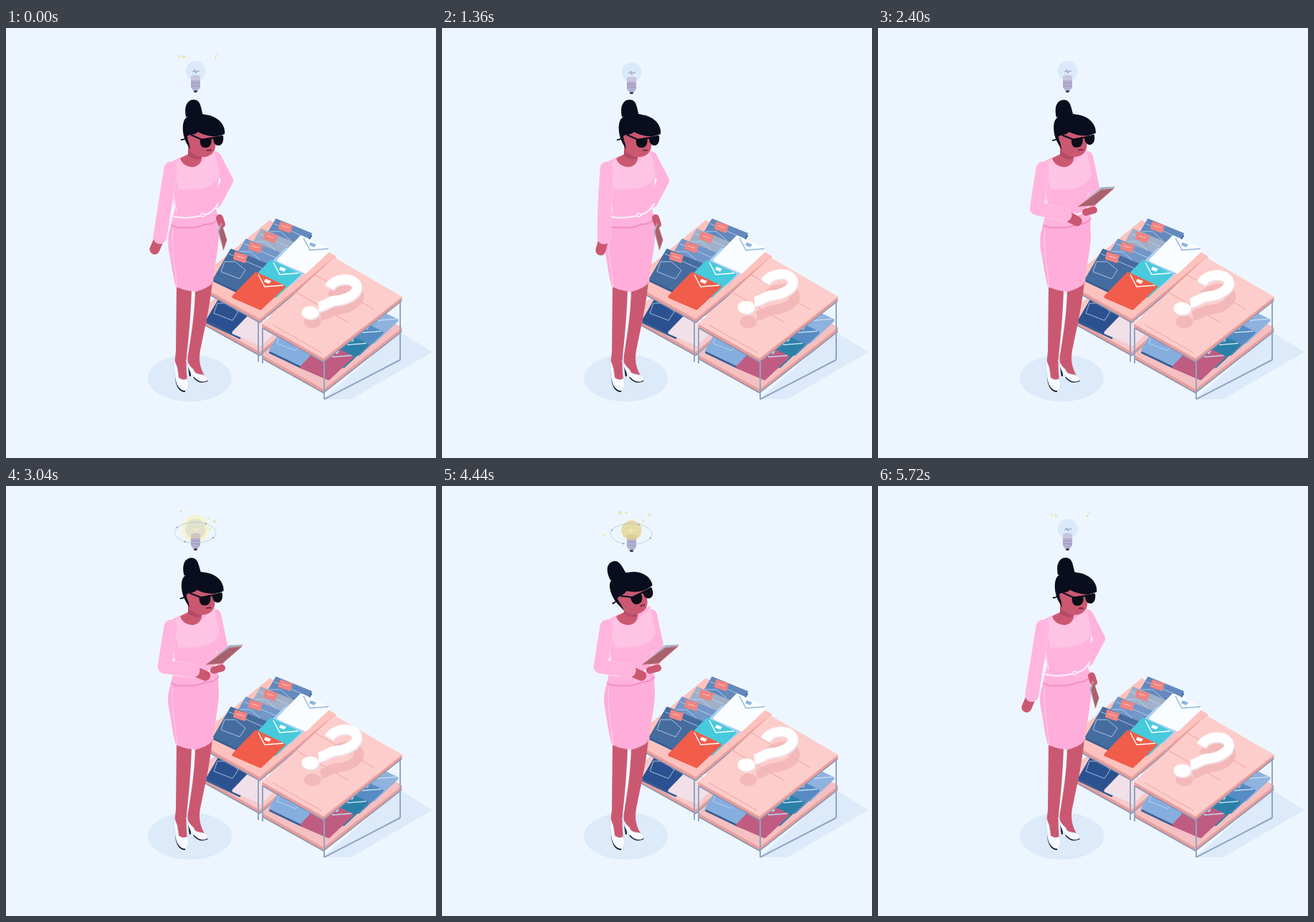
An HTML page for the animation above (5760 ms loop, 600 by 600 pixels).

```html
<!DOCTYPE html>
<html lang="en">
<head>
<meta charset="utf-8">
<style>
html, body { margin: 0; width: 100%; height: 100%; overflow: hidden; background: #edf6fe; }
svg { display: block; width: 100vw; height: 100vh; }
.limb { fill: none; stroke-linecap: round; stroke-linejoin: round; }
.skin { fill: #cb5871; }
.flesh { stroke: #cb5871; }
.hair { fill: #090d1d; }
.shoe { fill: #f7f9ff; stroke: #c9d4ea; stroke-width: .6; }
</style>
</head>
<body>
<svg viewBox="0 0 600 600">
  <path fill="#dceafa" d="M443 518H482L595 452 549 424Z"/>
  <ellipse cx="256.500" cy="488.500" rx="58.500" ry="33" fill="#dceafa"/>
  <g id="shop"></g>

  <g id="markShadow" transform="translate(3 23)" color="#f1b5b6" opacity=".8"></g>
  <g id="mark"><g transform="translate(1 2)" color="#f1dfe7"></g><g color="#fff"></g></g>

  <!-- legs and shoes -->
  <path class="skin" d="M264 360L288 354C284 392 277 420 272 445 268 462 270 474 279 488H266C257 478 252 470 254 456 259 425 264 395 264 360Z"/>
  <path class="skin" d="M238 358L259 364C258 400 255 430 252 458 251 472 252 482 253 492H238C234 480 235 468 237 452Z"/>
  <path d="M255 471L257 486M237 488Q239 507 250 507M262 487Q270 497 281 492" fill="none" stroke="#111629" stroke-width="2.200"/>
  <path class="shoe" d="M251 463Q257 473 262 477C264 486 275 481 281 487 284 494 273 495 267 491 259 485 255 477 251 463Z"/>
  <path class="shoe" d="M234 461L239 474 241 488Q248 493 253 489 258 502 250 506 240 505 237 492 234 476 234 461Z"/>

  <!-- skirt and top -->
  <path fill="#ffaddb" d="M233 270C225 285 225 302 228 314 231 332 233 347 237 361Q250 367 264 368 280 364 287 357C291 335 296 310 297 292L296 264Z"/>
  <path fill="none" stroke="#ffc7e6" stroke-width="1.500" d="M233 281C230 302 236 335 239 362"/>
  <path fill="#ffb3dc" d="M246 179C234 186 226 187 222 193L236 250 230 275Q240 280 250 278 264 280 278 274 290 274 297 266L290 243C295 228 298 212 298 195L290 167 272 178Z"/>
  <path fill="none" stroke="#f48fc6" stroke-width="2" d="M230 275Q240 280 250 278 264 280 278 274 290 274 297 266"/>
  <path id="rightSleeve" class="limb" stroke="#ffb3dc" stroke-width="16"/>
  <path fill="#ffc3e4" d="M238 185L246 180Q258 199 274 186L291 170 298 205Q292 219 280 222 262 227 240 225 236 202 238 185Z"/>
  <path fill="none" stroke="#fff1fa" stroke-width="2.200" d="M234 263Q250 267 272 262 289 259 296 245"/>
  <circle cx="274.500" cy="261" r="2.500" fill="#ffb3dc" stroke="#fff1fa" stroke-width="1.300"/>
  <path fill="none" stroke="#ffe0f2" stroke-width="1.300" d="M232 222L238 257"/>
  <path class="skin" d="M243 182L254 176V164H273V179Q274 191 262 194 247 194 243 182Z"/>
  <path fill="#a9445d" opacity=".65" d="M254 170Q265 180 273 179V182Q263 185 254 178Z"/>

  <g id="head">
    <path class="skin" d="M250 139L253 162C257 174 265 181 276 180 286 179 291 173 292 166L294 146 288 136Z"/>
    <path class="hair" d="M251 124C248 109 253 100 262 100 272 100 272 112 275 122Z"/>
    <path class="hair" d="M254 164C246 152 245 136 249 128 255 119 268 118 279 121 296 123 307 136 305 148 294 153 281 152 268 145 263 150 258 147 254 152L257 170Z"/>
    <path d="M256 149Q251 156 244 156" fill="none" stroke="#090d1d" stroke-width="1.800"/>
    <path class="skin" d="M253 151Q259 146 261 155L259 163Q254 162 253 151Z"/>
    <path d="M258 149L274 156 302 151" fill="none" stroke="#111629" stroke-width="2.300"/>
    <path fill="#0b0e19" d="M271 155L286 153C288 160 285 167 279 167 272 168 270 161 271 155ZM289 153L303 150C304 158 302 163 297 164 291 164 289 159 289 153Z"/>
    <path d="M280 171Q284 170 287 171" fill="none" stroke="#702638" stroke-width="1.800"/>
  </g>

  <!-- arms and notebook -->
  <path id="leftHand" class="limb flesh" stroke-width="14"/>
  <path id="sleeveEdge" class="limb" stroke="#ffc9e7" stroke-width="19.500"/>
  <path id="leftSleeve" class="limb" stroke="#ffb5dd" stroke-width="18"/>
  <path id="rightHand" class="limb flesh" stroke-width="10"/>
  <g id="notebook">
    <path fill="#9db3c6" d="M-26 -3L13 -8 30 2 -6 8Z"/>
    <path fill="#a8616d" stroke="#d97f80" stroke-width=".7" d="M-29 -3L11 -5 27 3 -9 8Z"/>
  </g>

  <!-- bulb -->
  <g id="bulb">
    <circle id="halo" cx="264.500" cy="60" r="19" fill="#f8f2c9"/>
    <circle cx="264.500" cy="60" r="14" fill="#dbeafb"/>
    <path fill="#c8c6de" d="M258 67Q264.500 64 271 67V74H258Z"/>
    <circle id="glow" cx="264.500" cy="60" r="14" fill="#edcd58"/>
    <path fill="#b3afd0" d="M258 73H271V83L267 88H262L258 83Z"/>
    <path d="M258 76L271 77M258 80L271 81" stroke="#9794bd" stroke-width=".8"/>
    <ellipse cx="264.500" cy="88.500" rx="2.600" ry="1.500" fill="#343650"/>
    <path id="filament" fill="none" stroke-width=".9" d="M260 61H262L263.500 58 265 63 266.500 60H270"/>
    <g id="orbit"><ellipse cx="264" cy="65" rx="29" ry="14.500" fill="none" stroke="#a9c0da" stroke-width=".8"/><g id="moons" fill="#7e9fc4"></g></g>
  </g>
  <g id="sparks" fill="none" stroke="#ecd067"></g>
</svg>
<script>
const $ = id => document.getElementById(id);
const LOOP = 5760, BOB = LOOP / 3;
const at = (x, y, content) => `<g transform="translate(${x} ${y})">${content}</g>`;
const shape = (d, fill, join = 0) =>
  `<path d="M${d}Z" fill="${fill}" stroke="${fill}" stroke-width="${join}" stroke-linejoin="round"/>`;
const line = (d, color, width = 1) =>
  `<path d="${d}" fill="none" stroke="${color}" stroke-width="${width}"/>`;

// ----- shop display -----
const rear = '368 268L460 318 354 406 262 355';
const near = '458 320L553 375 443 461 357 413';
const plank = (top, y, fill) =>
  at(0, y + 6, shape(top, '#8e94b0')) +
  [4, 3, 2, 1].map(d => at(0, y + d, shape(top, '#e99e9c'))).join('') +
  at(0, y, shape(top, fill));

const jeans = (x, y, color) => at(x, y,
  at(0, 3, shape('290 350L314 309 363 329 336 372', '#365d92', 2)) +
  shape('290 350L314 309 363 329 336 372', color, 2) +
  line('M311 315L359 336M300 340L305 326 320 326 334 338 326 350Z', '#c6d9f0', .8) +
  shape('320 313L336 318 333 327 318 322', '#f08482', 2) +
  line('M322 318L332 321', '#ffc3bd'));

const shirt = (x, y, color, trim = '#fff') => at(x, y,
  shape('318 375L349 343 387 361 355 391', color, 5) +
  line('M352 344L361 361 387 359', trim, 1.400) +
  shape('362 350L370 353 367 357 360 354', trim));

// Rows of folded clothes, drawn from the back to the front.
const row = (item, x, y, rise, colors, trim) =>
  colors.map((c, i) => item(x + 21 * i, y - rise * i, c, trim)).reverse().join('');
const pole = d => line(d, '#8fa5c3', 2);

$('shop').innerHTML =
  plank(rear, 46, '#f7c9ca') +
  jeans(-10, 58, '#2b5190') + shirt(0, 50, '#f1e0e8') +
  plank(rear, 0, '#fdc2be') +
  row(jeans, 0, 0, 14, ['#456c9f', '#7297c9', '#9fb0c8', '#6389bd']) +
  row(shirt, 0, 0, 17, ['#f15d4a', '#47cadb', '#a9cff5']) +
  shirt(63, -51, '#fafdff', '#8fb4de') +
  pole('M352 410V466M444 518L550 463') +
  plank(near, 43, '#f4c0c1') +
  jeans(78, 100, '#85aedf') +
  row(shirt, 95, 98, 17, ['#c05c82', '#2c80a7', '#568bc3', '#8fb2df'], '#bfdcf0') +
  plank(near, 0, '#fdcdcb') +
  line('M431 344L514 393M402 367L478 411M372 414L440 453', '#f1aaa8', 1.100) +
  pole('M358 418V468M444 466V518M550 380V463');

const question = `<ellipse cx="424.500" cy="387" rx="12" ry="9" fill="currentColor"/>
  <path d="M451 352C458 339 482 336 489 348 494 360 474 369 461 370 451 370 446 378 436 379"
    fill="none" stroke="currentColor" stroke-width="13.500"/>`;
for (const g of [$('markShadow'), ...$('mark').children]) g.innerHTML = question;

// ----- motion -----
const ease = (t, from, to) => {
  const k = Math.min(1, Math.max(0, (t - from) / (to - from)));
  return k * k * (3 - 2 * k);
};
// Rises from a to b, holds, then falls from c to d.
const pulse = (t, a, b, c, d) => ease(t, a, b) - ease(t, c, d);
const random = seed => {
  const v = Math.sin(seed * 127.1) * 43758.5453;
  return v - Math.floor(v);
};
const polar = ([x, y], r, degrees) => {
  const a = degrees * Math.PI / 180;
  return [x + r * Math.cos(a), y + r * Math.sin(a)];
};
const setPath = (id, ...points) => $(id).setAttribute('d', 'M' + points.join('L'));
const fade = (id, value) => $(id).setAttribute('opacity', value);
const place = (id, value) => $(id).setAttribute('transform', value);

function drawArms(t) {
  const hang = pulse(t, 0, 760, 5150, 5660);
  const turn = pulse(t, 1450, 2380, 5150, 5660);
  const fold = pulse(t, 1850, 2500, 5150, 5660);

  const shoulder = [230, 196];
  const elbow = [222 + 5 * hang - 6 * fold, 246 + 6 * fold];
  const angle = 99 - 8 * hang - 83 * fold;
  const wrist = polar(elbow, 46 - 6 * fold, angle);
  setPath('leftSleeve', shoulder, elbow, wrist);
  setPath('sleeveEdge', shoulder, elbow, wrist);
  setPath('leftHand', wrist, polar(wrist, 19, angle + 14));

  setPath('rightSleeve', [292, 180], [309 - 6 * turn, 213 + 19 * turn], [293, 243 + 9 * turn]);
  setPath('rightHand', [298 - 8 * turn, 265 - 8 * turn], [301, 274 - 20 * turn]);
  place('notebook', `translate(${302 + 3 * turn} ${291 - 55 * turn})
    rotate(${-100 + 67 * turn}) scale(${.66 + .34 * turn})`);
}

function drawBulb(t) {
  const drop = 8 * pulse(t, 0, 700, 700, 1700) + 6 * pulse(t, 4250, 4750, 4750, 5500);
  const lit = pulse(t, 2800, 3500, 4200, 4700);
  place('bulb', `translate(0 ${drop})`);
  fade('glow', lit);
  fade('halo', .85 * pulse(t, 2450, 3040, 3800, 4600));
  fade('orbit', .85 * pulse(t, 2700, 3040, 5100, 5450));
  $('filament').setAttribute('stroke', lit > .15 ? '#fff4bd' : '#7e88a2');
  $('moons').innerHTML = [0, 1, 2, 3].map(i => {
    const [x, y] = polar([0, 0], 29, t / BOB * 360 + i * 90);
    return `<circle cx="${264 + x}" cy="${65 + y / 2}" r="1.200"/>`;
  }).join('');
}

// Small sparks leave the bulb one after another and fade on the way.
function drawSparks(t) {
  let out = '';
  for (let i = 0; i < 22; i++) {
    const age = (t - 2500 - 140 * i + LOOP) % LOOP / 900;
    if (age > 1) continue;
    const [x, y] = polar([264, 62], 18 + 26 * age, 165 + 210 * random(i + 1));
    const r = .8 + random(i + 50);
    out += `<g opacity="${Math.sin(age * Math.PI)}">` + (i % 2
      ? `<circle cx="${x}" cy="${y}" r="${r}"/>`
      : `<path d="M${x - r} ${y}l${r} ${-r} ${r} ${r} ${-r} ${r}Z"/>`) + '</g>';
  }
  $('sparks').innerHTML = out;
}

function draw(t) {
  const tilt = -2.5 * pulse(t, 1200, 2800, 4350, 5700) - 14.5 * pulse(t, 3040, 3700, 4350, 5700);
  place('head', `rotate(${tilt} 268 182)`);
  place('mark', `translate(0 ${4.2 + 5.8 * Math.cos(t / BOB * 2 * Math.PI)})`);
  drawArms(t);
  drawBulb(t);
  drawSparks(t);
}

const start = performance.now();
function frame() {
  draw((performance.now() - start) % LOOP);
  requestAnimationFrame(frame);
}
frame();
</script>
</body>
</html>
```
